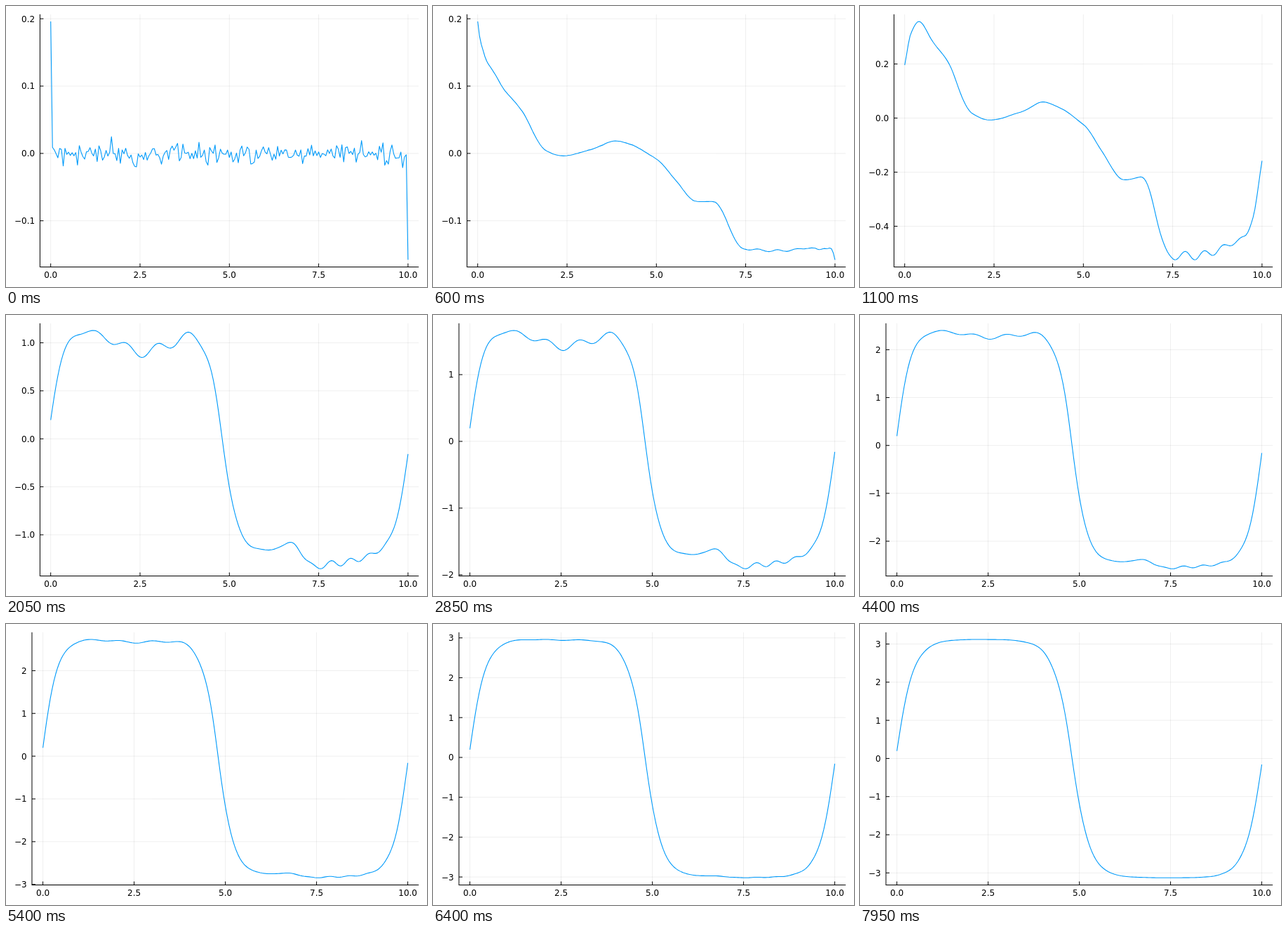
Recreate the animation shown at these times as an HTML page with a canvas. Size 600 px wide and 400 px high, loop 8000 ms.

```html
<!DOCTYPE html>
<html lang="en">
<head>
<meta charset="utf-8">
<title>Relaxing profile</title>
<style>
  html, body { margin: 0; width: 100%; height: 100%; overflow: hidden; background: #fff; }
  canvas { display: block; }
</style>
</head>
<body>
<canvas id="plot" width="600" height="400"></canvas>
<script>
const ctx = document.getElementById('plot').getContext('2d');
const STEP_MS = 50, STEPS = 160, CELLS = 200;
const TOP = 11.8, BOTTOM = 371.5, RIGHT = 588.2, PAD = 0.03;
const START = 0.196, END = -0.158, CROSSING = 4.8;

// Monotone cubic through [x, y] key points
function curve(points) {
  const last = points.length - 1;
  const slope = i => (points[i + 1][1] - points[i][1]) / (points[i + 1][0] - points[i][0]);
  const tangents = points.map((_, i) => {
    if (i === 0) return slope(0);
    if (i === last) return slope(last - 1);
    const a = slope(i - 1), b = slope(i);
    return a * b <= 0 ? 0 : 2 * a * b / (a + b);
  });
  return x => {
    let i = 0;
    while (i < last - 1 && x > points[i + 1][0]) i++;
    const [x0, y0] = points[i], [x1, y1] = points[i + 1];
    const h = x1 - x0, s = (x - x0) / h, r = 1 - s;
    return r * r * ((1 + 2 * s) * y0 + s * h * tangents[i])
         + s * s * ((3 - 2 * s) * y1 - r * h * tangents[i + 1]);
  };
}

// Plateau height by step; the first slow wave is complete at FORMED, the plateaus at SPLIT.
const height = curve([[0, 0], [12, .155], [22, .5], [41, 1.16], [57, 1.7],
  [88, 2.44], [128, 2.99], [159, 3.128]]);
const FORMED = 0.5, SPLIT = 1.16;

const slowWave = curve([[0, START], [.17, .312], [.4, .355], [.75, .3], [1.25, .205],
  [1.9, .02], [2.4, -.01], [3.1, .02], [3.85, .061], [5, -.024], [5.5, -.117],
  [6.1, -.226], [6.6, -.235], [7.4, -.43], [8.6, -.45], [9.5, -.43], [9.75, -.36], [10, END]]);

// Two opposite plateaus joined by a kink, pinned at both ends
function plateaus(x, a) {
  const scale = Math.tan(a / 4);
  const steep = 1.6 + .7 * (1 - (a / Math.PI) ** 5);
  const offset = u => Math.atanh(Math.tan(Math.abs(u) / 4) / scale);
  const shape = Math.tanh(steep * x + offset(START))
    * Math.tanh(steep * (CROSSING - x))
    * Math.tanh(steep * (10 - x) + offset(END));
  return 4 * Math.atan(scale * shape);
}

// Fixed ripple made of wave packets; it scales with sin(u)
const packets = [
  { at: 2.6, width: 1.1, size: -.28 },
  { at: 2.98, width: 2, size: .065, period: .87 },
  { at: 6.7, width: .35, size: -.14 },
  { at: 7.4, width: .25, size: .07 },
  { at: 7.9, width: 1.2, size: .15 },
  { at: 8.12, width: 1.3, size: .035, period: .53 },
];
const ripple = x => packets.reduce((sum, { at, width, size, period = Infinity }) =>
  sum + size * Math.exp(-(((x - at) / width) ** 2)) * Math.cos(2 * Math.PI * (x - at) / period), 0);

let seed = 20;
const random = () => (seed = (seed * 16807) % 2147483647) / 2147483647;
const noise = Array.from({ length: CELLS + 1 },
  () => (random() + random() + random() + random() - 2) * .0155);

function smoothNoise(i, radius) {
  const part = noise.slice(Math.max(0, i - radius), i + radius + 1);
  return part.reduce((a, b) => a + b, 0) / part.length;
}

const mix = (a, b, s) => a + (b - a) * s;

function profile(n) {
  const a = height(n);
  const forming = Math.min(1, a / FORMED);
  const splitting = Math.max(0, Math.min(1, (a - FORMED) / (SPLIT - FORMED)));
  const reach = .008 + .05 * Math.sqrt(n);
  return noise.map((_, i) => {
    const x = i * 10 / CELLS;
    if (i === 0) return START;
    if (i === CELLS) return END;
    const rest = START * Math.exp(-x / reach) + END * Math.exp((x - 10) / reach)
      + (forming < 1 ? smoothNoise(i, 2 * n) : 0);
    const wave = mix(rest, slowWave(x), forming);
    const u = mix(wave, plateaus(x, Math.max(a, SPLIT)), splitting);
    return u + ripple(x) * Math.sin(u) * forming;
  });
}

// Picks round tick values, favouring nice steps and about five ticks
function chooseTicks(lo, hi) {
  const niceness = [[1, 1], [5, .9], [2, .7], [2.5, .5], [3, .2]];
  let best = { score: -1 };
  for (const power of [.01, .1, 1]) {
    for (const [q, nice] of niceness) {
      const step = q * power;
      const first = Math.ceil(lo / step), count = Math.floor(hi / step) - first + 1;
      if (count < 4 || count > 8) continue;
      const score = .25 * (1 - Math.abs(count - 5) / 5)
        + .5 * (hi - lo) / ((count - 1) * step) + .25 * nice;
      if (score > best.score) best = { score, step, first, count };
    }
  }
  const digits = [0, 1, 2].find(d => Math.abs(best.step - best.step.toFixed(d)) < 1e-9);
  return Array.from({ length: best.count }, (_, i) => {
    const value = (best.first + i) * best.step;
    const text = Math.abs(value).toFixed(digits);
    return { value, text: value < -1e-9 ? '\u2212' + text : text };
  });
}

function strokeLine(x1, y1, x2, y2, color) {
  ctx.strokeStyle = color;
  ctx.beginPath();
  ctx.moveTo(x1, y1);
  ctx.lineTo(x2, y2);
  ctx.stroke();
}

function draw(n) {
  const values = profile(n);
  const min = Math.min(...values), max = Math.max(...values);
  const lo = min - PAD * (max - min), hi = max + PAD * (max - min);
  const yTicks = chooseTicks(lo, hi);
  const xTicks = [0, 2.5, 5, 7.5, 10];

  ctx.font = '12px "DejaVu Sans", sans-serif';
  const left = 19.3 + Math.max(...yTicks.map(t => ctx.measureText(t.text).width));
  const px = x => left + (x + 10 * PAD) / (10 + 20 * PAD) * (RIGHT - left);
  const py = u => BOTTOM - (u - lo) / (hi - lo) * (BOTTOM - TOP);

  ctx.fillStyle = '#fff';
  ctx.fillRect(0, 0, 600, 400);
  ctx.lineWidth = 1;
  const grid = 'rgba(0,0,0,0.065)', ink = '#000';
  for (const x of xTicks) strokeLine(px(x), TOP, px(x), BOTTOM, grid);
  for (const t of yTicks) strokeLine(left, py(t.value), RIGHT, py(t.value), grid);

  strokeLine(left, BOTTOM, RIGHT, BOTTOM, ink);
  strokeLine(left, TOP, left, BOTTOM + .5, ink);
  ctx.fillStyle = ink;
  ctx.textAlign = 'center';
  for (const x of xTicks) {
    strokeLine(px(x), BOTTOM, px(x), BOTTOM - 5, ink);
    ctx.fillText(x.toFixed(1), px(x), 387.4);
  }
  ctx.textAlign = 'right';
  for (const t of yTicks) {
    strokeLine(left, py(t.value), left + 5, py(t.value), ink);
    ctx.fillText(t.text, left - 7.3, py(t.value) + 4.4);
  }

  ctx.strokeStyle = '#009afa';
  ctx.lineWidth = 1.1;
  ctx.lineJoin = 'round';
  ctx.beginPath();
  values.forEach((u, i) => ctx.lineTo(px(i * 10 / CELLS), py(u)));
  ctx.stroke();
}

const origin = performance.now();
let shown = -1;
function tick() {
  const n = Math.floor((performance.now() - origin) / STEP_MS) % STEPS;
  if (n !== shown) draw(shown = n);
  requestAnimationFrame(tick);
}
tick();
</script>
</body>
</html>
```
